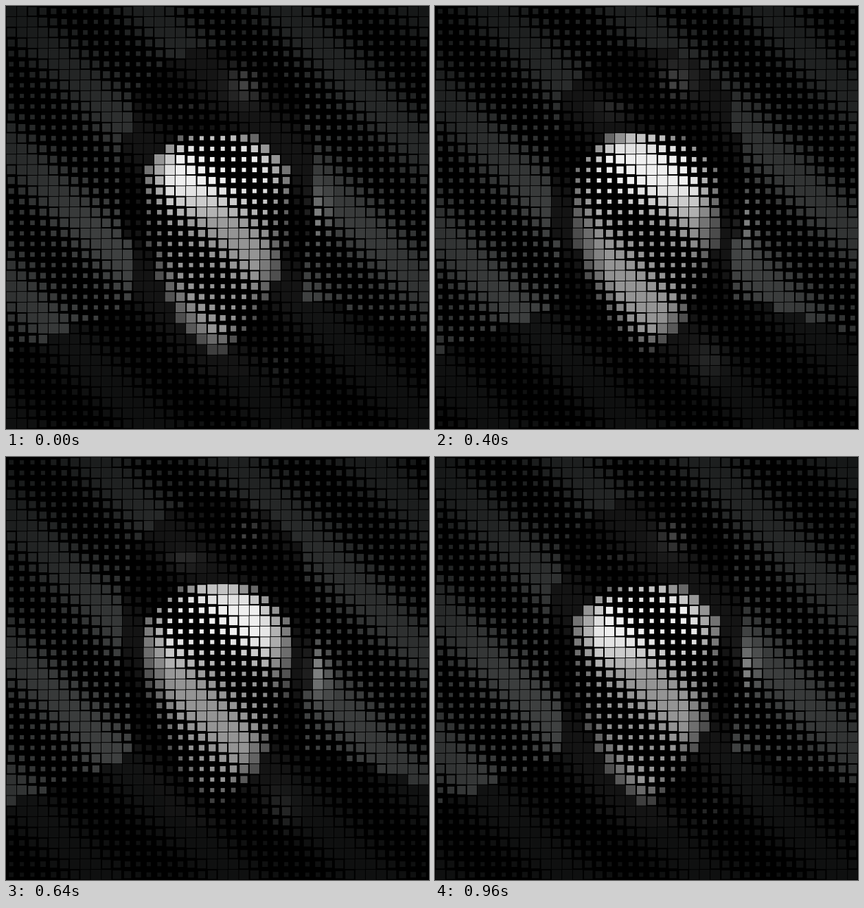
An HTML page with a canvas for the animation above (1040 ms loop, 616x616 px).

```html
<!DOCTYPE html>
<html lang="en">
<head>
<meta charset="utf-8">
<title>Halftone wave</title>
<style>
  html, body { margin: 0; width: 100%; height: 100%; overflow: hidden; background: #000; }
  canvas { display: block; width: 100vw; height: 100vh; }
</style>
</head>
<body>
<canvas id="stage" width="616" height="616"></canvas>
<script>
const ctx = document.getElementById('stage').getContext('2d');
const SIZE = 616, N = 40, CELL = SIZE / N, CX = SIZE / 2;
const STEPS = 13, STEP_MS = 80;
const MIN_SIDE = 6, MAX_SIDE = 14.7;

// 0 before a, 1 after b, linear between.
const ramp = (a, b, v) => Math.min(1, Math.max(0, (v - a) / (b - a)));

const glow = (x, y, gx, gy, rx, ry, power) =>
  power * Math.exp(-(((x - gx) / rx) ** 2) - ((y - gy) / ry) ** 2);

// Half width of the egg-shaped head at height y.
function headWidth(y) {
  const u = y < 300 ? (300 - y) / 118 : (y - 300) / 215;
  if (u >= 1) return 0;
  return 106 * (y < 300 ? Math.sqrt(1 - u ** 4) : (1 - u * u) ** 0.8);
}

function headTone(y, inset) {
  const light = 240 - 92 * ramp(262, 320, y);
  const rim = 0.45 + 0.55 * ramp(0, 38, inset);
  const ends = (0.75 + 0.25 * ramp(185, 215, y)) * (1 - 0.4 * ramp(470, 505, y));
  return light * rim * ends;
}

function inHair(dx, y) {
  const dy = Math.abs(y - 240) / (y < 240 ? 178 : 300);
  return (dx / 135) ** 2.5 + dy ** 2.5 < 1;
}

function shoulderLine(x, dx) {
  return x < CX ? 437 + (dx - 130) * 0.4 : 425 + (dx - 130) * 0.29;
}

// Small lights on the hair, beside the head and on the collar.
function accents(x, y) {
  return glow(x, y, 457, 308, 13, 38, 70)
    + glow(x, y, 350, 112, 24, 26, 48)
    + glow(x, y, 260, 150, 26, 13, 24)
    + glow(x, y, 400, 515, 20, 28, 22);
}

function color(x, y) {
  const dx = Math.abs(x - CX);
  const inset = headWidth(y) - dx;
  let v, tint = 0;
  if (inset > 0) {
    v = headTone(y, inset);
  } else {
    if (inHair(dx, y)) {
      v = 20;
    } else if (y > shoulderLine(x, dx)) {
      v = 19 - 4 * ramp(440, 560, y);
      tint = 1;
    } else {
      v = (29 + 38 * ramp(0, 320, y)) * (1 - 0.3 * (dx / CX) ** 2);
      tint = 2;
    }
    v += accents(x, y);
  }
  return `rgb(${Math.round(v)},${Math.round(v + tint)},${Math.round(v + tint)})`;
}

const cells = Array.from({ length: N * N }, (_, i) => {
  const col = i % N, row = Math.floor(i / N);
  const x = (col + 0.5) * CELL, y = (row + 0.5) * CELL;
  return { x, y, diag: col - row, fill: color(x, y) };
});

// The wave runs along the diagonal, one cell per step.
function side(diag, step) {
  const crest = (1 + Math.cos(2 * Math.PI * (diag - step) / STEPS)) / 2;
  return MIN_SIDE + (MAX_SIDE - MIN_SIDE) * crest ** 1.2;
}

function draw(step) {
  ctx.fillStyle = '#000';
  ctx.fillRect(0, 0, SIZE, SIZE);
  for (const { x, y, diag, fill } of cells) {
    const s = side(diag, step);
    ctx.fillStyle = fill;
    ctx.fillRect(x - s / 2, y - s / 2, s, s);
  }
}

const start = performance.now();
function tick() {
  const t = performance.now() - start;
  draw(Math.floor(t / STEP_MS) % STEPS);
  requestAnimationFrame(tick);
}
tick();
</script>
</body>
</html>
```
